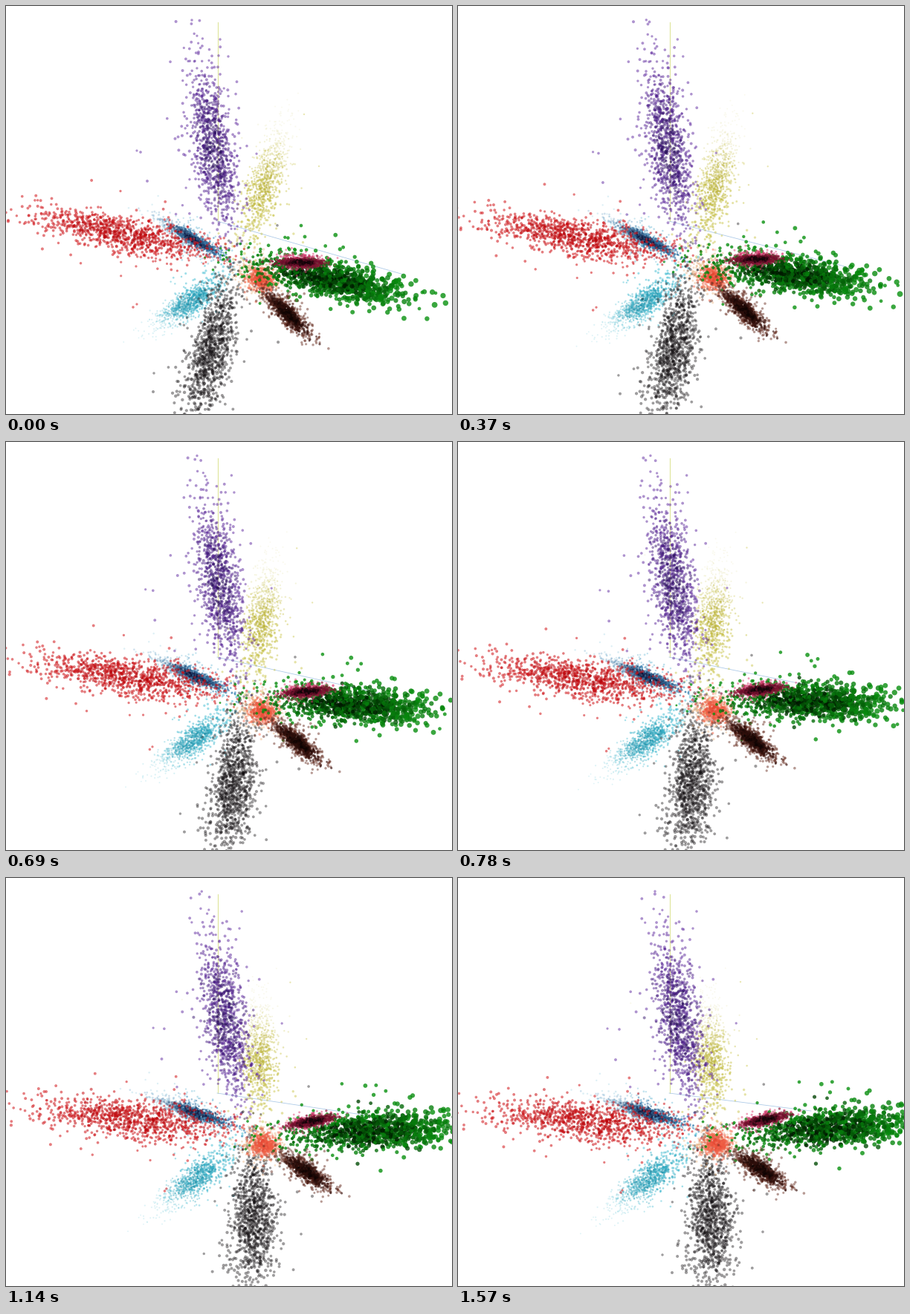
These frames come from a looping animation (600 px wide and 550 px high, 1600 ms). A matplotlib script:

```python
import numpy as np
import matplotlib.pyplot as plt
from matplotlib.animation import FuncAnimation

W, H, DPI = 600, 550, 100
FRAMES, STEP = 40, 40
TURN = 0.6  # how far the depth spread swings into view, in radians

# progress of the turn over one loop, with a pause before the end
TIMES = [30, 210, 370, 690, 900, 1070, 1140, 1240, 1440, 1570]
TURNED = [0, .16, .215, .45, .79, .865, .885, .925, .925, 1]

rng = np.random.default_rng(12)

fig = plt.figure(figsize=(W / DPI, H / DPI), dpi=DPI, facecolor="white")
ax = fig.add_axes([0, 0, 1, 1])
ax.set_xlim(0, W)
ax.set_ylim(H, 0)
ax.axis("off")


def lerp(a, b, p):
    return a + (b - a) * p


class Cloud:
    """Cigar of dots; a pose is (x, y, axis x, axis y, cross spread)."""

    def __init__(self, n, start, end, color, dark, alpha, size,
                 core=.8, grow=0, fade=0, tail=.06, extra=()):
        self.start, self.end = np.array(start, float), np.array(end, float)
        self.u, self.v, self.w = rng.normal(size=(3, n))
        far = np.where(rng.random(n) < tail, 2.1, 1)
        self.v *= far
        self.w *= far
        self.extra = np.array(extra, float).reshape(-1, 4)
        m = len(self.extra)

        near = np.exp(-(self.u ** 2 + self.v ** 2) / 2.2)
        mix = np.clip(core * near * rng.uniform(.1, 1.5, n), 0, 1)
        mix = np.append(mix, np.zeros(m))[:, None]
        rgba = np.ones((n + m, 4))
        rgba[:, :3] = lerp(np.array(color), np.array(dark), mix) / 255
        along = np.append(self.u, np.zeros(m))
        pale = np.clip(np.sign(fade) * along / 2 + .15, 0, 1) * abs(fade)
        rgba[:, 3] = alpha * (1 - pale)

        px = size * np.clip(1 + grow * along, .5, 1.6)
        px *= rng.uniform(.88, 1.12, n + m)
        self.dots = ax.scatter(np.zeros(n + m), np.zeros(n + m),
                               s=(px * 72 / DPI) ** 2, c=rgba, linewidths=0)

    def turn(self, p):
        x, y, ax_, ay, spread = lerp(self.start, self.end, p)
        length = np.hypot(ax_, ay)
        side = spread * (self.v * np.cos(TURN * p) + self.w * np.sin(TURN * p))
        pos = np.column_stack([x + self.u * ax_ - side * ay / length,
                               y + self.u * ay + side * ax_ / length])
        lone = lerp(self.extra[:, :2], self.extra[:, 2:], p)
        self.dots.set_offsets(np.vstack([pos, lone]))


ax.plot([284.5, 284.5], [22, 290], color="#dfe59a", lw=.8, zorder=.5)
floor, = ax.plot([], [], color="#aecbe8", lw=.6, zorder=.5)

clouds = [
    # yellow
    Cloud(850, (350, 235, -13, 40, 11), (340, 235, 1, 38, 11.5),
          (205, 200, 80), (180, 170, 50), .5, 2.6, grow=.12, fade=-.8,
          extra=[(401, 146, 380, 140), (421, 216, 402, 217)]),
    # cyan
    Cloud(850, (243, 402, 23, -16, 8.5), (253, 409, 25, -20, 9.5),
          (65, 190, 212), (25, 135, 160), .5, 2.6, grow=.1, fade=-.65),
    # blue
    Cloud(250, (245, 312, 24, 13, 9), (248, 313, 29, 9, 9),
          (90, 180, 210), (50, 130, 180), .4, 2.5, fade=-.5),
    Cloud(750, (250, 313, 20, 12, 3.8), (253, 316, 25, 8, 4.2),
          (60, 135, 185), (10, 12, 50), .6, 2.7, core=1.1, fade=-.6),
    # purple
    Cloud(950, (279, 190, 8, 52, 14), (298, 190, 8, 51, 14.5),
          (95, 40, 160), (35, 10, 85), .5, 3.6, core=.9,
          extra=[(250, 19, 265, 18), (288, 45, 321, 45), (299, 68, 316, 68),
                 (181, 197, 217, 204), (176, 195, 201, 203),
                 (190, 236, 212, 245)]),
    # red
    Cloud(1000, (158, 307, 61, 12, 11.5), (175, 327, 66, 6, 13),
          (210, 20, 25), (175, 0, 5), .55, 3.5, grow=-.03,
          extra=[(176, 402, 221, 421), (171, 406, 219, 424)]),
    # black
    Cloud(1000, (277, 460, -12, 48, 13.5), (340, 455, 1, 48, 15),
          (25, 22, 24), (10, 5, 8), .42, 3.8, grow=.04,
          extra=[(199, 495, 275, 508), (198, 520, 288, 532),
                 (297, 503, 410, 477)]),
    # tan haze and salmon
    Cloud(220, (338, 362, 18, 8, 13), (342, 358, 15, 4, 13),
          (235, 180, 125), (220, 140, 90), .4, 3),
    Cloud(420, (343, 369, 9, 4, 7), (348, 359, 9, 2, 7),
          (245, 105, 75), (225, 60, 45), .5, 3.2),
    # green
    Cloud(1000, (428, 367, 51, 10, 12), (490, 338, 57, -5, 12.5),
          (8, 145, 15), (0, 25, 0), .8, 5.2, core=1, grow=.13,
          extra=[(397, 296, 459, 275), (402, 311, 525, 284),
                 (578, 387, 640, 340), (560, 386, 625, 345),
                 (556, 408, 615, 362)]),
    # pink
    Cloud(330, (396, 344, 15, 0, 4.8), (411, 326, 15, -3.5, 4.5),
          (225, 65, 120), (150, 20, 60), .5, 3),
    Cloud(600, (397, 346, 13, 0, 2.5), (413, 326, 13, -3, 2.5),
          (140, 20, 55), (12, 3, 6), .65, 3.2, core=1.4, tail=0),
    # brown
    Cloud(550, (378, 414, 18, 18, 7.5), (407, 393, 19, 13, 7.5),
          (105, 45, 32), (55, 18, 12), .48, 3.3),
    Cloud(480, (379, 415, 11, 11, 4), (408, 393, 12, 8, 4),
          (60, 20, 15), (12, 3, 2), .65, 3.2, core=1.2, tail=0),
]


def draw(i):
    p = np.interp((i + .5) * STEP, TIMES, TURNED)
    floor.set_data([284, lerp(535, 475, p)], [290, lerp(362, 314, p)])
    for cloud in clouds:
        cloud.turn(p)
    return [floor] + [cloud.dots for cloud in clouds]


anim = FuncAnimation(fig, draw, frames=FRAMES, interval=STEP, repeat=True,
                     repeat_delay=0, blit=False)
plt.show()
```
